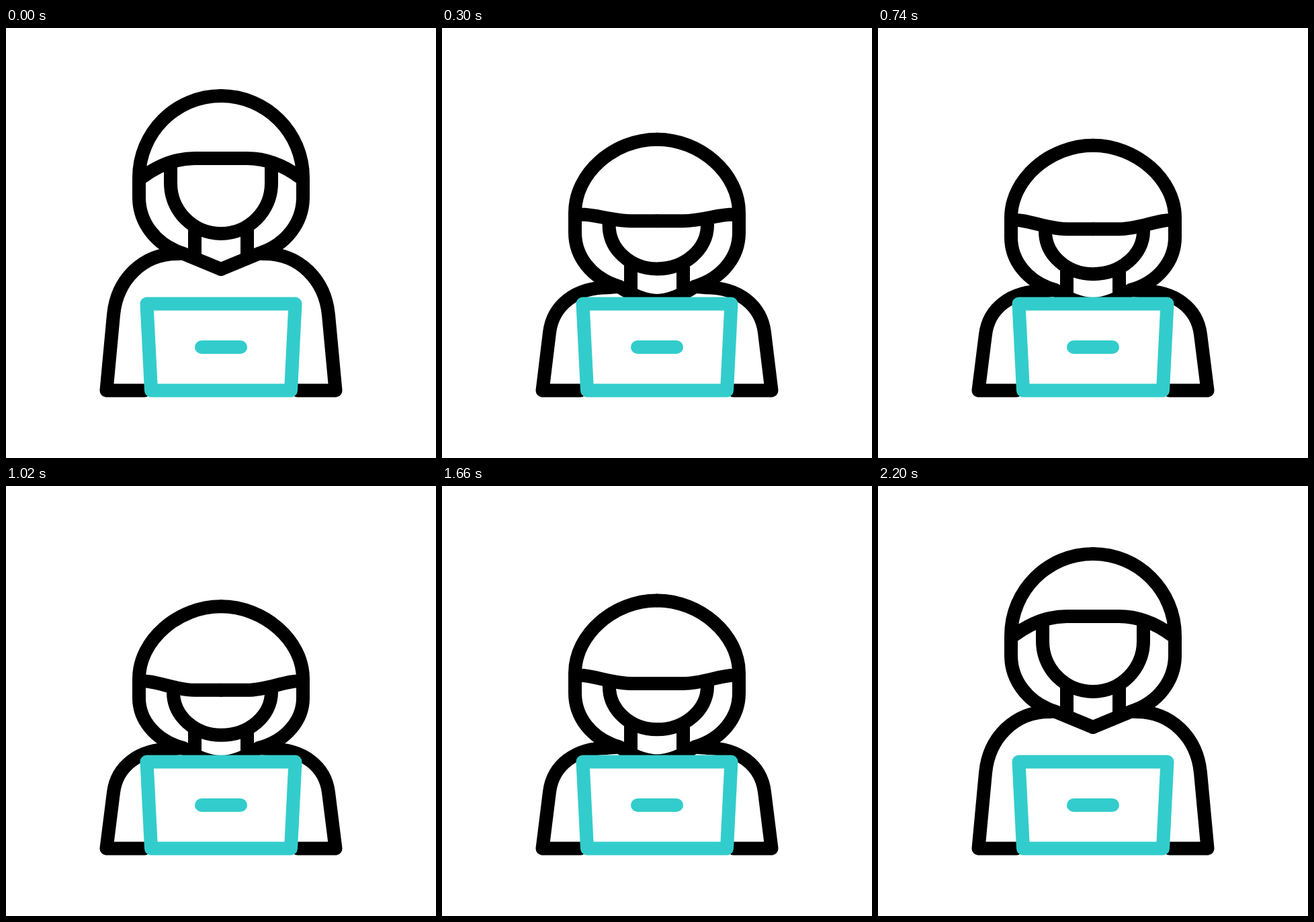
An HTML page for the animation above (2420 ms loop, 640 by 640 pixels).

```html
<!DOCTYPE html>
<html lang="en">
<head>
<meta charset="utf-8">
<title>Hooded figure at a laptop</title>
<style>
  html, body { margin: 0; height: 100%; overflow: hidden; background: #fff; }
  svg {
    display: block; width: 100vw; height: 100vh;
    fill: none; stroke-width: 20; stroke-linecap: round; stroke-linejoin: round;
  }

  .half, .face {
    d: var(--up);
    stroke: #000;
    animation: duck 2420ms infinite;
  }

  /* Left half of the figure: hood and collar, shoulder, brow, neck */
  .half {
    --up: path("M320 101 C252.6 101 198 155.6 198 223 L198 252 C198 290 224 323 262 335 C281 343 301 351 320 359 M262 335.5 L255 336 C203 336 165 375 160 427 L149.5 539.5 L206 539.5 M203 222 C226 205 252 194 281 194 L320 194 M281 300 L281 341");
    --low: path("M320 172.5 C256 172.5 198 223 198 280 L198 310 C198 345 222 378 264 390 C280 402 303 411 320 411 M264 390 L246 391.5 C198 391.5 165 417 160 456 L149.5 539.5 L206 539.5 M203 283.5 C226 283.5 252 297 281 297 L320 297 M281 358 L281 398");
    --deep: path("M320 180 C256 180 198 230.5 198 287.5 L198 316 C198 348 222 379 264 390 C280 402 303 411 320 411 M264 390 L246 391.5 C198 391.5 165 417 160 456 L149.5 539.5 L206 539.5 M203 291 C226 291 252 304.5 281 304.5 L320 304.5 M281 365.5 L281 398");
  }

  .face {
    --up: path("M245 205 L245 231 C245 272.4 278.6 306 320 306 C361.4 306 395 272.4 395 231 L395 205");
    --low: path("M249 297 L249 300 C249 335.3 280.8 364 320 364 C361.4 364 395 335.3 395 300 L395 297");
    --deep: path("M249 304.5 L249 307.5 C249 342.8 280.8 371.5 320 371.5 C361.4 371.5 395 342.8 395 307.5 L395 304.5");
  }

  @keyframes duck {
    0%     { d: var(--up);   animation-timing-function: cubic-bezier(.333, 0, .667, 1); }
    15.37% { d: var(--low);  animation-timing-function: cubic-bezier(.6, 0, .667, 1); }
    47.52% { d: var(--deep); animation-timing-function: cubic-bezier(.333, 0, .667, 1); }
    66.12% { d: var(--low);  animation-timing-function: cubic-bezier(.333, 0, .667, 1); }
    90.91%, 100% { d: var(--up); }
  }

  .laptop { stroke: #3cc; }
</style>
</head>
<body>
<svg viewBox="0 0 640 640">
  <path class="half"/>
  <g transform="matrix(-1 0 0 1 640 0)"><path class="half"/></g>
  <path class="face"/>
  <g class="laptop">
    <path fill="#fff" d="M209.5 410.5 H430.5 L424 539.5 H216 Z"/>
    <path d="M291 475 H349"/>
  </g>
</svg>
</body>
</html>
```
